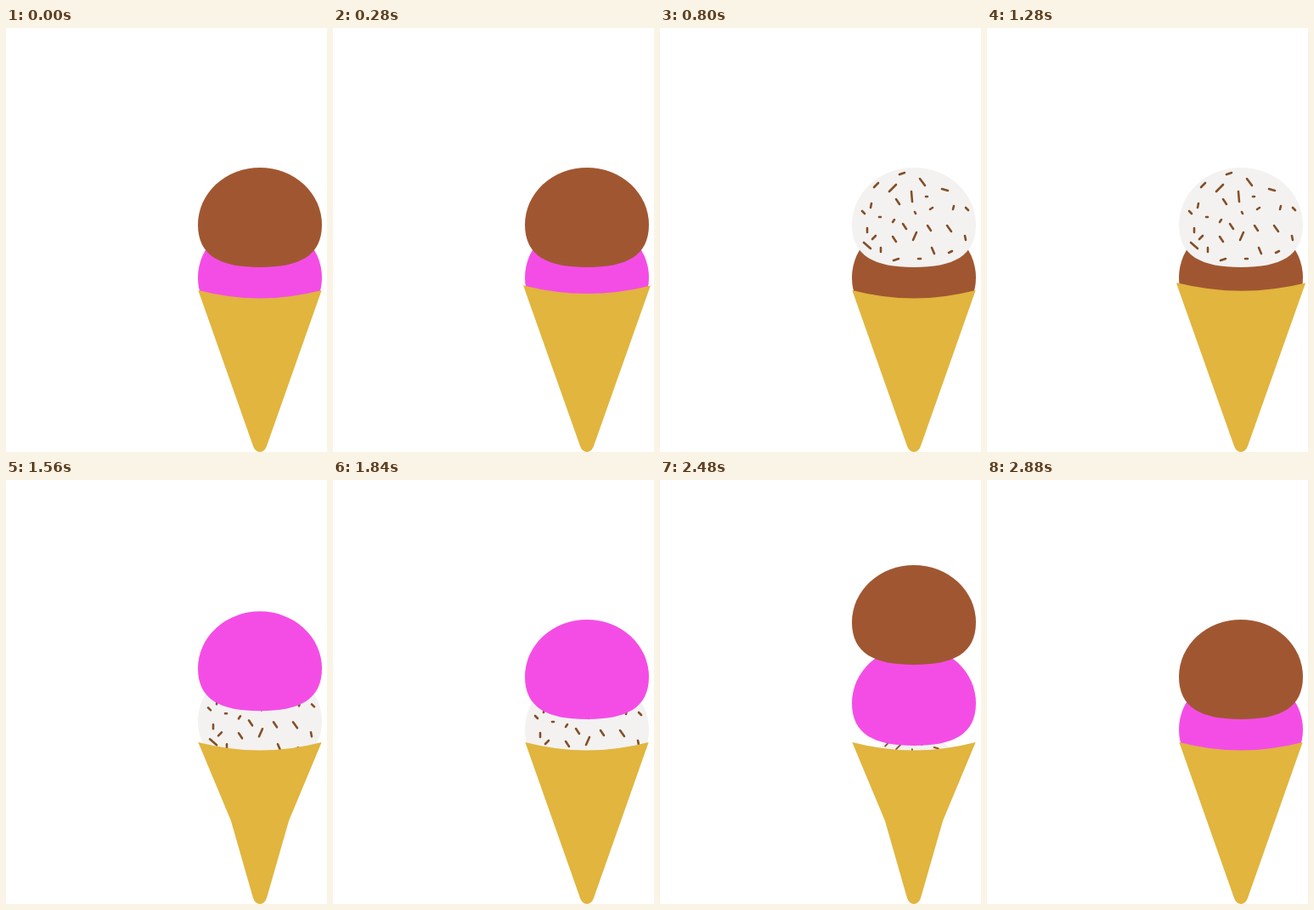
These frames come from a looping animation (378x498 px, 2.92 s). An HTML page with a canvas:

```html
<!DOCTYPE html>
<html lang="en">
<head>
<meta charset="utf-8">
<title>Ice cream</title>
<style>
html, body { margin: 0; width: 100%; height: 100%; overflow: hidden; background: #fff; }
canvas { display: block; }
</style>
</head>
<body>
<canvas id="stage" width="378" height="498"></canvas>
<script>
const ctx = document.getElementById('stage').getContext('2d');
const LOOP = 2920, STEP = 40;
const DROP_TIME = 160, RISE_TIME = 400, RISE_LEAD = 465;
const CX = 299, TOP_Y = 164, MID_Y = 226, RIM_Y = 308;

const BROWN = { fill: '#a05731' };
const PINK = { fill: '#f44de6' };
const VANILLA = { fill: '#f3f2f1', sprinkled: true };

// Each turn: one scoop lands on top, the lowest one sinks into the cone.
const turns = [
  { drop: 480, next: VANILLA, top: BROWN, mid: PINK, from: 95, stretch: 7.5 },
  { drop: 1440, next: PINK, top: VANILLA, mid: BROWN, from: 102, stretch: 10 },
  { drop: 2400, next: BROWN, top: PINK, mid: VANILLA, from: 36, stretch: 10 }
];

// Sprinkle end points (x1, y1, x2, y2) relative to the top centre of a scoop.
const sprinkles = [
  [-17, 8, -11, 6], [-47, 23, -42, 18], [-29, 28, -21, 20], [7, 13, 13, 21],
  [33, 25, 40, 27], [-3, 28, -2, 40], [-21, 37, -17, 43], [14, 34, 16, 34],
  [-50, 42, -51, 47], [-61, 51, -58, 54], [-41, 58, -39, 58], [-25, 64, -23, 61],
  [1, 52, 2, 54], [19, 49, 22, 47], [47, 45, 46, 49], [61, 47, 64, 50],
  [-55, 71, -55, 76], [-49, 84, -45, 80], [-59, 88, -51, 95], [-39, 94, -39, 99],
  [-25, 81, -21, 87], [-13, 66, -9, 72], [3, 76, -1, 85], [16, 68, 20, 74],
  [39, 68, 44, 75], [60, 80, 61, 85], [21, 94, 24, 101], [41, 100, 45, 98],
  [5, 107, 8, 107], [-24, 109, -18, 107]
];

const clamp = x => Math.min(1, Math.max(0, x));
const smooth = x => x * x * (3 - 2 * x);
const sine = x => (1 - Math.cos(Math.PI * x)) / 2;
const mix = (a, b, k) => a + (b - a) * k;

function drawScoop(scoop, y, scale = 1, alpha = 1) {
  ctx.save();
  ctx.translate(CX, y);
  ctx.scale(scale, scale);
  ctx.globalAlpha = alpha;
  ctx.fillStyle = scoop.fill;
  ctx.beginPath();
  ctx.ellipse(0, 67, 73, 67, 0, Math.PI, 0);
  ctx.bezierCurveTo(73, 104, 46, 117, 0, 117);
  ctx.bezierCurveTo(-46, 117, -73, 104, -73, 67);
  ctx.fill();
  if (scoop.sprinkled) {
    ctx.globalAlpha = 1;
    ctx.strokeStyle = '#844f28';
    ctx.lineWidth = 2.6;
    ctx.lineCap = 'round';
    ctx.beginPath();
    for (const [x1, y1, x2, y2] of sprinkles) {
      ctx.moveTo(x1, y1);
      ctx.lineTo(x2, y2);
    }
    ctx.stroke();
  }
  ctx.restore();
}

function drawCone(rim, waistY, pinch) {
  const lift = RIM_Y - rim;
  const mid = CX + lift * 0.1;
  const half = 72.7 + lift * 0.4;
  const waist = mix(half, 8, (waistY - rim) / (491 - rim)) - pinch;
  ctx.fillStyle = '#e1b53e';
  ctx.beginPath();
  ctx.moveTo(mid - half, rim);
  ctx.quadraticCurveTo(mid, rim + 19, mid + half, rim);
  ctx.lineTo(CX + waist, waistY);
  ctx.lineTo(CX + 8, 491);
  ctx.quadraticCurveTo(CX + 5.5, 498, CX, 498);
  ctx.quadraticCurveTo(CX - 5.5, 498, CX - 8, 491);
  ctx.lineTo(CX - waist, waistY);
  ctx.fill();
}

function draw(t) {
  const turn = turns.find(u => t < u.drop + RISE_LEAD + 30) || turns[2];
  const x = (t - turn.drop) / DROP_TIME;
  const p = smooth(clamp(x));
  const rise = sine(clamp((t - turn.drop + RISE_LEAD) / RISE_TIME));
  const give = 1 - clamp(p / 0.45) ** 2;

  ctx.clearRect(0, 0, 378, 498);
  if (p < 1) drawScoop(turn.mid, MID_Y + 140 * p, 1 - 0.56 * p);
  drawScoop(turn.top, mix(TOP_Y, MID_Y, p));
  if (p > 0) drawScoop(turn.next, mix(turn.from, TOP_Y, p), 1, clamp(2 * x));

  const pinch = 6 * clamp(2 * x) * (1 - clamp(x - 1));
  drawCone(RIM_Y - turn.stretch * rise * give, 300 + 100 * clamp(2 * x), pinch);
}

const start = performance.now();
function frame() {
  const t = (performance.now() - start) % LOOP;
  draw(Math.floor(t / STEP) * STEP);
  requestAnimationFrame(frame);
}
frame();
</script>
</body>
</html>
```
